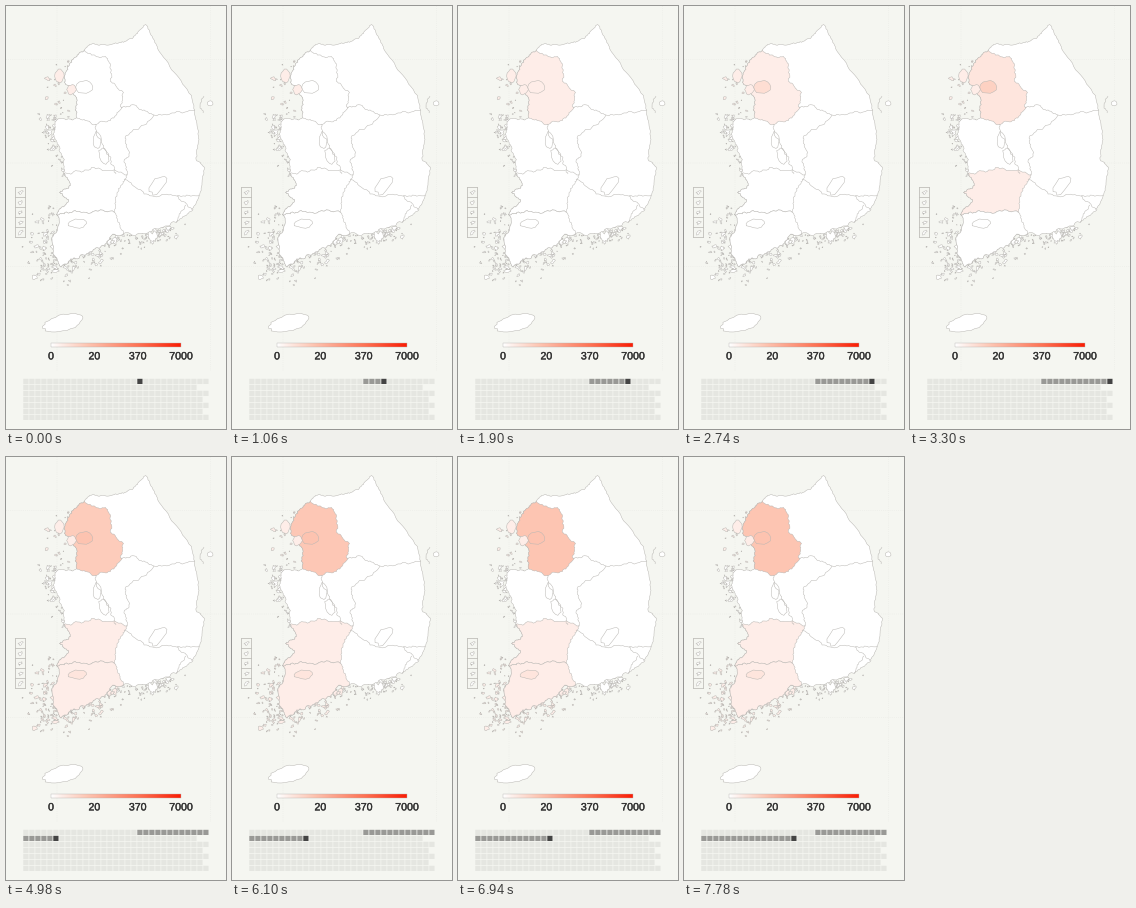
Recreate the animation shown at these times as a matplotlib script. Size 220 by 423 pixels, loop 8 s.

```python
import math
import random

import matplotlib.pyplot as plt
import numpy as np
from matplotlib.animation import FuncAnimation
from matplotlib.collections import LineCollection, PolyCollection
from matplotlib.colors import LinearSegmentedColormap
from matplotlib.patheffects import withStroke

W, H, DPI = 220, 423, 100
PX = 72 / DPI
TICK = 20
FIRST_HOLD, DAY_HOLD, LOOP = 500, 280, 8000
PAPER, LINE, INK = "#f5f6f1", "#bab8b4", "#333333"
HEAT = LinearSegmentedColormap.from_list(
    "heat", [(0, "#ffffff"), (0.08, "#feede8"), (0.28, "#fdc5b2"),
             (0.67, "#ff7355"), (1, "#fb1d05")])

plt.rcParams["path.snap"] = False
rng = random.Random(12)

# First day with a case, total reached, day of fastest growth, its time scale
OUTBREAKS = {
    "incheon": (0, 1, 0, 1),
    "seoul": (4, 12, 11, 1.2),
    "gyeonggi": (6, 11, 15.5, 2),
    "jeonbuk": (11, 1, 11, 1),
    "gwangju": (15, 2, 16, 1),
    "jeonnam": (17, 1, 17, 1),
}


def cases_on(province, day):
    first, top, middle, scale = OUTBREAKS[province]
    if day < first:
        return 0
    return round(1 + (top - 1) / (1 + math.exp((middle - day) / scale)))


def heat(count):
    return HEAT(math.log(count + 1) / math.log(7001))


def rough(points, wild=1.0, depth=4):
    """Break each edge by midpoint displacement of at most `wild` pixels."""
    for _ in range(depth):
        finer = []
        for (x0, y0), (x1, y1) in zip(points, points[1:]):
            length = math.hypot(x1 - x0, y1 - y0) or 1
            shift = rng.uniform(-1, 1) * min(0.25 * length, wild) / length
            finer += [(x0, y0), ((x0 + x1) / 2 - shift * (y1 - y0),
                                 (y0 + y1) / 2 + shift * (x1 - x0))]
        points = finer + [points[-1]]
    return points


def blob(x, y, a, b, tilt=0, jitter=0.15, n=14):
    """Closed uneven ellipse with half-axes a and b, tilted in degrees."""
    tilt = math.radians(tilt)
    pts = []
    for i in range(n):
        angle, size = i * math.tau / n, 1 + rng.uniform(-jitter, jitter)
        u, v = size * a * math.cos(angle), size * b * math.sin(angle)
        pts.append((x + u * math.cos(tilt) - v * math.sin(tilt),
                    y + u * math.sin(tilt) + v * math.cos(tilt)))
    return pts + pts[:1]


def islets(arc, count, shift, spread):
    """Ragged specks scattered off a stretch of coast."""
    out = []
    for _ in range(count):
        x, y = rng.choice(arc)
        r = 0.4 + min(rng.expovariate(1.3), 2.6)
        out.append(blob(x + shift[0] + rng.gauss(0, spread),
                        y + shift[1] + rng.gauss(0, spread),
                        r, r * rng.uniform(0.4, 0.9), rng.uniform(0, 180), 0.6, 10))
    return out


# Coast, clockwise from the north-west; neighbours share these arcs
north = rough([(78, 44), (83, 38), (105, 38), (126, 32), (139, 18)], 0.7)
east = rough([(139, 18), (151, 42), (185, 89), (192, 130), (190, 154),
              (198, 161), (193, 189), (186, 204), (170, 216)], 0.7)
south = rough([(170, 216), (148, 222), (117, 227)], 4)
jeonnam_coast = rough([(117, 227), (98, 239), (76, 248), (54, 260), (47, 240),
                       (50, 208)], 5)
jeonbuk_coast = rough([(50, 208), (62, 193), (53, 186), (64, 179), (57, 167)], 1.5)
chungnam_coast = rough([(57, 167), (53, 140), (47, 128), (53, 112), (70, 111)], 3)
gyeonggi_coast = rough([(70, 111), (69, 90), (58, 76), (59, 66), (67, 52),
                        (78, 44)], 2)

# Inland borders
gyeonggi_east = rough([(78, 44), (99, 50), (104, 72), (117, 86), (115, 102)], 2)
gyeonggi_south = rough([(115, 102), (104, 114), (90, 118), (70, 111)])
jeonbuk_north = rough([(57, 167), (85, 161), (121, 168)], 2)
jeonbuk_east = rough([(121, 168), (112, 182), (108, 206)])
jeonbuk_south = rough([(108, 206), (70, 205), (50, 208)], 1.5)
jeonnam_east = rough([(108, 206), (117, 227)])
other_borders = [rough(points, 1.2) for points in (
    [(115, 102), (125, 99), (148, 109), (189, 104)],
    [(148, 109), (119, 132), (123, 149), (118, 155), (121, 168)],
    [(90, 118), (91, 130), (103, 150), (110, 168)],
    [(118, 173), (138, 188), (171, 190), (193, 189)],
    [(171, 190), (186, 204)],
    [(180, 199), (170, 216)])]
other_borders += [blob(91, 134, 4, 8), blob(98, 150, 4.5, 8, -20),
                  blob(152, 179, 11, 5.5, -50, 0.25)]

mainland = (north + east + south + jeonnam_coast + jeonbuk_coast
            + chungnam_coast + gyeonggi_coast)
provinces = {
    "gyeonggi": [gyeonggi_coast + gyeonggi_east + gyeonggi_south],
    "jeonbuk": [jeonbuk_coast + jeonbuk_north + jeonbuk_east + jeonbuk_south],
    "jeonnam": [jeonnam_coast + jeonbuk_south[::-1] + jeonnam_east],
    "incheon": [blob(65.5, 83.5, 4.5, 5), blob(53.5, 70, 4.5, 6.5)],
    "seoul": [blob(78, 80.5, 8.5, 6.5)],
    "gwangju": [blob(71, 217, 9, 4.5)],
}
islands = {
    "incheon": islets(gyeonggi_coast, 26, (-12, 12), 5),
    "jeonnam": islets(jeonnam_coast, 230, (-9, 4), 9),
    "others": (islets(south, 75, (0, 6), 5) + islets(chungnam_coast, 45, (-5, 0), 5)
               + [blob(147, 231, 6, 4, 60, 0.5), blob(57, 317, 20, 8, -14, 0.08, 30)]),
}

fig = plt.figure(figsize=(W / DPI, H / DPI), dpi=DPI, facecolor=PAPER)
ax = fig.add_axes([0, 0, 1, 1])
ax.axis("off")


def add_polys(polys, z, face="white", edge=LINE, width=0.5):
    group = PolyCollection(polys, facecolors=face, edgecolors=edge,
                           linewidths=width * PX, zorder=z)
    ax.add_collection(group, autolim=False)
    return group


def add_lines(lines, z, color=LINE, width=0.5, style="solid"):
    ax.add_collection(LineCollection(lines, colors=color, linewidths=width * PX,
                                     linestyles=style, zorder=z), autolim=False)


# Map
add_lines([[(0, y), (W, y)] for y in (53.5, 157, 260.5)]
          + [[(x, 0), (x, 365)] for x in (51, 204.5)], 0, "#ecede8", 0.8, "dotted")
painted = {name: [] for name in OUTBREAKS}
for name, polys in islands.items():
    group = add_polys(polys, 1)
    if name in painted:
        painted[name].append(group)
add_polys([mainland], 2)
for z, (name, polys) in enumerate(provinces.items(), 3):
    painted[name].append(add_polys(polys, z))
add_lines(other_borders, 10)

# Remote islands
add_lines([[(9, 181.5 + 10 * i), (20, 181.5 + 10 * i)] for i in range(6)]
          + [[(x, 181.5), (x, 231.5)] for x in (9.5, 19.5)], 1, "#bdbcb7", 0.8)
add_polys([blob(14.5, 186.5 + 10 * i, 2.2, 1.2, -40, 0.6) for i in range(5)], 2)
add_lines([rough([(198, 90), (194, 99), (197, 107)])], 1)
add_polys([blob(203.5, 97, 2.8, 2.5)], 1)

# Legend
BAR_LEFT, BAR_RIGHT = 45, 175
ax.imshow(np.linspace(0, 1, 260)[None], cmap=HEAT, aspect="auto", zorder=5,
          extent=(BAR_LEFT, BAR_RIGHT, 341, 337), interpolation="nearest")
add_lines([[(BAR_LEFT, 341), (BAR_LEFT, 337), (BAR_RIGHT, 337),
            (BAR_RIGHT, 341), (BAR_LEFT, 341)]], 6, "#b5b3b0", 0.4)
for i, label in enumerate(("0", "20", "370", "7000")):
    x = BAR_LEFT + (BAR_RIGHT - BAR_LEFT) * i / 3
    ax.text(x, 353.4, label, ha="center", va="baseline", color=INK,
            family="Liberation Sans", size=10.6 * PX,
            path_effects=[withStroke(linewidth=0.35 * PX, foreground=INK)])
ax.set_xlim(0, W)
ax.set_ylim(H, 0)

# Calendar: one row per month, January to July
MONTHS = (31, 29, 31, 30, 31, 30, 31)
START, PITCH, SIDE = 19, 6, 5.2
cells = []
for row, length in enumerate(MONTHS):
    for col in range(length):
        x, y = 17.3 + PITCH * col, 372.8 + PITCH * row
        cells.append([(x, y), (x + SIDE, y), (x + SIDE, y + SIDE), (x, y + SIDE)])
calendar = add_polys(cells, 5, edge="none", width=0)


def update(frame):
    t = frame * TICK
    day = 0 if t < FIRST_HOLD else 1 + (t - FIRST_HOLD) // DAY_HOLD
    for name, groups in painted.items():
        for group in groups:
            group.set_facecolor(heat(cases_on(name, day)))
    colors = ["#e5e6e1"] * len(cells)
    colors[START:START + day] = ["#999996"] * day
    colors[START + day] = "#444444"
    calendar.set_facecolor(colors)
    return [calendar]


anim = FuncAnimation(fig, update, frames=LOOP // TICK, interval=TICK,
                     repeat=True, repeat_delay=0, blit=False)
plt.show()
```
